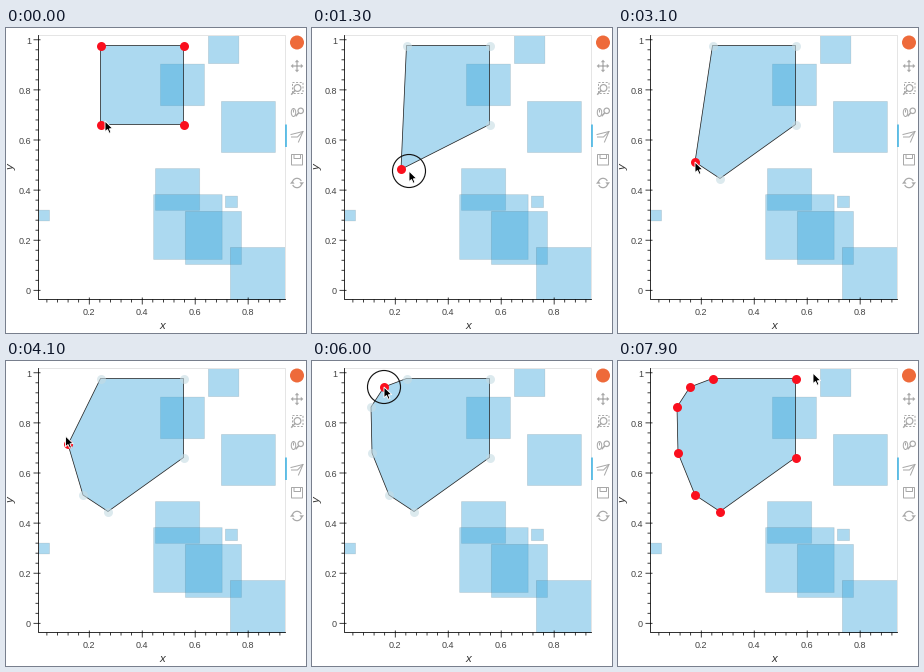
Animation of 300 by 305 pixels, one loop 8 s. Source, as a matplotlib script:

```python
import numpy as np
import matplotlib.pyplot as plt
from matplotlib.animation import FuncAnimation
from matplotlib.patches import Arc, Circle, Ellipse, Polygon, Rectangle

W, H, DPI = 300, 305, 100
PX = 72 / DPI  # points per pixel
STEPS, STEP_MS = 80, 100

BLUE, RED, GREY = "#30a2da", "#fa0f1e", "#a8a8a8"
LEFT, RIGHT, TOP, BOTTOM = 32.5, 279.5, 7.5, 271.5

# Background squares in data units: left, top, size
SQUARES = [
    (.469, .903, .166), (.650, 1.02, .115), (.699, .754, .204),
    (.450, .486, .167), (.443, .382, .259), (.563, .315, .212),
    (.714, .376, .046), (.007, .320, .043), (.733, .171, .212),
]

# Three corners stay put; the fourth is dragged, then new ones are added
X0, X1, Y0, Y1 = 94.5, 177.5, 17.5, 96.5
FIXED = [(X0, Y0), (X1, Y0), (X1, Y1)]
CORNER = (X0, Y1)

# Pointer: first place, then straight moves (from step, to step, goal)
ORIGIN = (99, 93)
MOVES = [
    (0, 3, (95, 97)), (4, 10, (73, 138)), (10, 13, (97, 143)),
    (13, 17, (102, 150.5)), (27, 30, (77, 134)), (34, 41, (59.5, 75)),
    (41, 44, (60, 92)), (49, 52, (59, 46)), (54, 57, (72, 26)),
    (66, 75, (195, 12)),
]
DROPS = [18, 33, 46, 53, 61]      # steps at which a point is set down
EDITING = [(4, 18), (27, 61)]     # a point follows the pointer
PRESSED = [(3, 18), (21, 24), (32, 34), (44, 47), (58, 61)]

ARROW = np.array([(0, 0), (0, 10.8), (2.5, 8.5), (4.2, 12.3), (6, 11.5),
                  (4.4, 7.8), (7.8, 7.6)])

plt.rcParams["path.snap"] = False
fig = plt.figure(figsize=(W / DPI, H / DPI), dpi=DPI, facecolor="white")
ax = fig.add_axes([0, 0, 1, 1])
ax.set_xlim(0, W)
ax.set_ylim(H, 0)
ax.axis("off")


def line(points, color="black", width=1.0, **kw):
    xs, ys = zip(*points)
    return ax.plot(xs, ys, color=color, lw=width * PX, **kw)[0]


def label(x, y, text, size, **kw):
    ax.text(x, y, text, fontsize=size * PX, family="Liberation Sans", **kw)


def box(x0, y0, x1, y1, **kw):
    return ax.add_patch(Rectangle((x0, y0), x1 - x0, y1 - y0, **kw))


def to_x(v):
    return 30.3 + 264.8 * v


def to_y(v):
    return 262.3 - 250.5 * v


def draw_squares():
    frame = Rectangle((LEFT, TOP), RIGHT - LEFT, BOTTOM - TOP,
                      transform=ax.transData)
    for x, y, size in SQUARES:
        bounds = to_x(x), to_y(y), to_x(x + size), to_y(y - size)
        for style in (dict(fc=BLUE, alpha=0.4, lw=0),
                      dict(fill=False, ec="black", alpha=0.1, lw=0.8 * PX)):
            box(*bounds, **style).set_clip_path(frame)


def draw_axes():
    line([(LEFT, TOP), (RIGHT, TOP), (RIGHT, BOTTOM)], "#e5e5e5")
    line([(LEFT, TOP), (LEFT, BOTTOM), (RIGHT, BOTTOM)], width=0.8, zorder=3)
    tick = dict(width=0.75, zorder=3, solid_capstyle="butt")
    text = dict(size=9, color="#444444")
    for i in range(26):
        v = i / 25
        major = i % 5 == 0
        out, inner = (5, 2) if major else (3, 0)
        x, y = to_x(v), to_y(v)
        name = f"{v:.1f}" if 0 < i < 25 else f"{v:.0f}"
        line([(LEFT - out, y), (LEFT + inner, y)], **tick)
        if major:
            label(25, y + 0.3, name, ha="right", va="center_baseline", **text)
        if LEFT < x < RIGHT:
            line([(x, BOTTOM - inner), (x, BOTTOM + out)], **tick)
            if major:
                label(x, 287, name, ha="center", va="baseline", **text)
    title = dict(size=11.5, color="#333333", style="italic", ha="center")
    label(156.5, 301, "x", va="baseline", **title)
    label(6, 139, "y", va="center", rotation=90, **title)


def magnifier(x, y, r):
    line([(x - 0.7 * r, y + 0.7 * r), (x - 1.7 * r, y + 1.8 * r)], GREY, 1.5)
    ax.add_patch(Circle((x, y), r, fc="white", ec=GREY, lw=1.2 * PX, zorder=3))


def draw_toolbar():
    ax.add_patch(Circle((291, 14.5), 7, fc="#ee6a3a", lw=0))
    line([(280, 96.5), (280, 119)], "#26aae1", 1.4, solid_capstyle="butt")
    shape = dict(fill=False, ec=GREY, lw=PX)

    # pan
    for dx, dy in [(1, 0), (-1, 0), (0, 1), (0, -1)]:
        bx, by = 291 + 3.8 * dx, 38 + 3.8 * dy
        line([(291, 38), (bx, by)], GREY, 1.2)
        ax.add_patch(Polygon([(291 + 6.3 * dx, 38 + 6.3 * dy),
                              (bx + 2.2 * dy, by + 2.2 * dx),
                              (bx - 2.2 * dy, by - 2.2 * dx)], fc=GREY, lw=0))

    # box zoom
    box(286.5, 54.5, 297, 65.5, ls=(0, (2, 1.6)), **shape)
    magnifier(291.5, 60, 3.4)

    # wheel zoom
    ax.add_patch(Ellipse((287.5, 84.5), 4.4, 8, **shape))
    line([(287.5, 82), (287.5, 84)], GREY)
    magnifier(294.7, 82.8, 2.7)

    # polygon edit
    line([(285, 106.5), (297, 103.5), (292.5, 114)], GREY)
    line([(285.5, 109), (291.5, 109), (297, 103.5)], GREY)

    # save
    box(285.5, 126.5, 296.5, 137, **shape)
    box(288, 126.5, 294.5, 130.5, **shape)

    # reset
    for s in (1, -1):
        start = 105 - 90 * s
        ax.add_patch(Arc((291, 155), 9.4, 9.4, theta1=start,
                         theta2=start + 140, ec=GREY, lw=1.2 * PX))
        ax.add_patch(Polygon([(291 + s * 2.4, 155 - s * 0.7),
                              (291 + s * 7, 155 - s * 0.7),
                              (291 + s * 4.7, 155 + s * 2.2)], fc=GREY, lw=0))


def pointer(step):
    pos = np.array(ORIGIN, float)
    for begin, end, goal in MOVES:
        u = np.clip((step - begin) / (end - begin), 0, 1)
        pos = pos + u * (np.array(goal) - pos)
    return pos


def within(step, spans):
    return any(a <= step < b for a, b in spans)


draw_squares()
draw_axes()
draw_toolbar()

fill = ax.add_patch(Polygon([CORNER] * 3, fc=BLUE, alpha=0.4, lw=0, zorder=2))
edge = ax.add_patch(Polygon([CORNER] * 3, fill=False, ec="#222222",
                            lw=0.75 * PX, zorder=4))
dot = dict(marker="o", ls="", mew=0, ms=9 * PX)
pale = ax.plot([], [], color="#c6dce4", alpha=0.6, zorder=5, **dot)[0]
vivid = ax.plot([], [], color=RED, zorder=6, **dot)[0]
press = ax.add_patch(Circle(CORNER, 16.5, fill=False, ec="#111111",
                            lw=1.15 * PX, zorder=7))
arrow = ax.add_patch(Polygon(ARROW, fc="black", ec="white", lw=0.9 * PX,
                             zorder=8))


def update(step):
    points = FIXED + [tuple(pointer(t)) for t in DROPS if step >= t]
    editing = within(step, EDITING)
    if editing:
        active = [tuple(pointer(step - 1))]  # the point trails the pointer
    else:
        active = [CORNER] if step < EDITING[0][0] else []
    outline = points + active
    fill.set_xy(outline)
    edge.set_xy(outline)
    pale.set_data(*(zip(*points) if editing else ([], [])))
    vivid.set_data(*zip(*(active if editing else outline)))

    tip = pointer(step)
    press.set_center(tip)
    press.set_visible(within(step, PRESSED))
    arrow.set_xy(ARROW + tip)
    return fill, edge, pale, vivid, press, arrow


anim = FuncAnimation(fig, update, frames=STEPS, interval=STEP_MS,
                     repeat=True, repeat_delay=0, blit=False)
plt.show()
```
